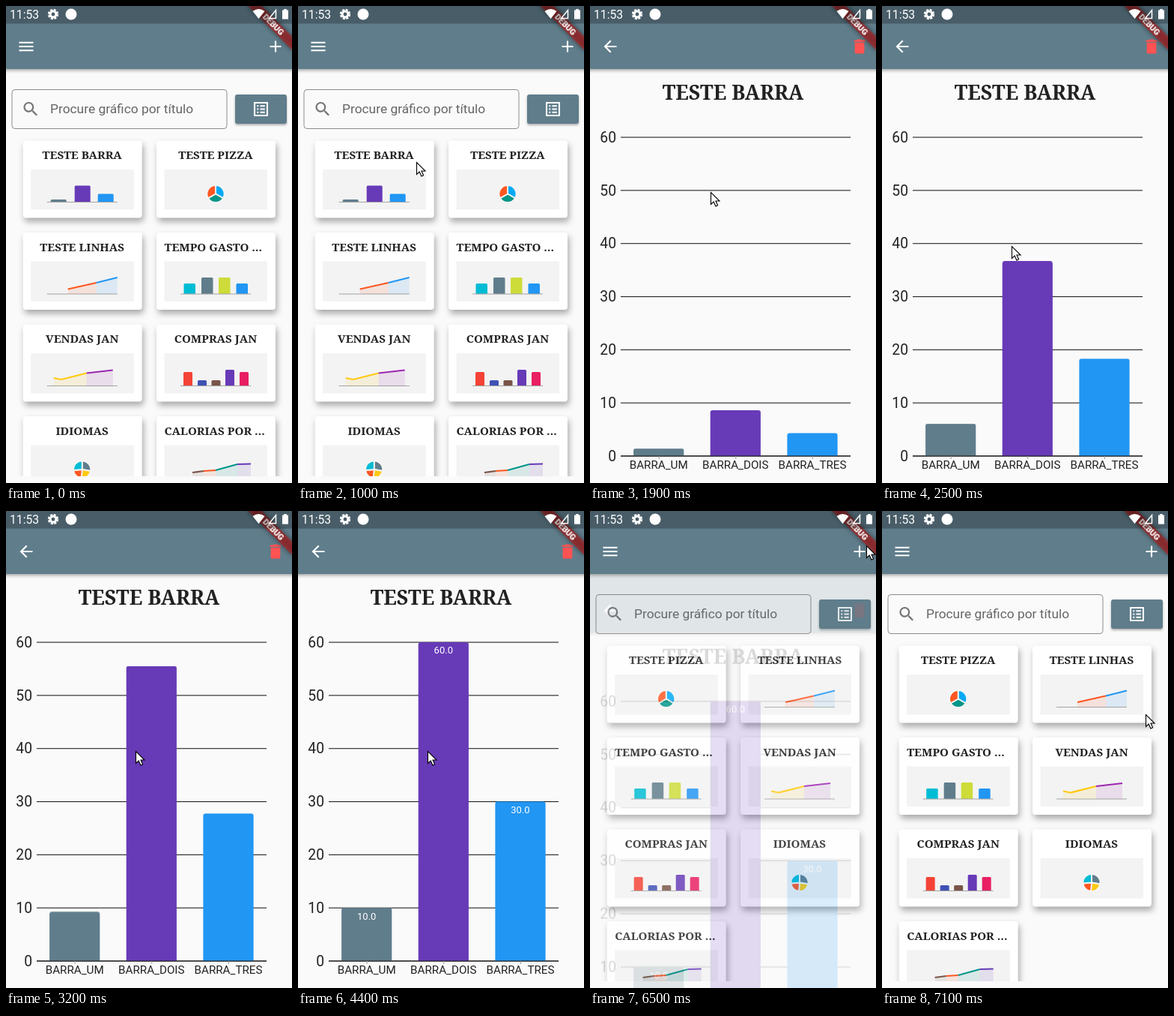
These frames come from a looping animation (382x636 px, 7.2 s). An HTML page:

```html
<!DOCTYPE html>
<html lang="pt">
<head>
<meta charset="utf-8">
<title>Gráficos</title>
<style>
html, body { margin: 0; width: 100%; height: 100%; overflow: hidden; background: #fafafa; }
svg { display: block; width: 100%; height: 100%; font-family: Roboto, sans-serif; }
.serif { font-family: "Noto Serif", serif; font-weight: 700; fill: #212121; }
.mid { text-anchor: middle; }
.end { text-anchor: end; }
.bar { filter: drop-shadow(0 2px 2px rgba(0, 0, 0, .35)); }
.card { filter: drop-shadow(2px 5px 4.5px rgba(0, 0, 0, .33)); }
.button { filter: drop-shadow(0 2px 1.5px rgba(0, 0, 0, .3)); }
.blur { filter: blur(3.7px); }

#before, #after, #detail, #cursor, #labels, #bars path {
  animation: 7200ms linear infinite paused;
}
#before { animation-name: before; animation-timing-function: step-end; }
#after { animation-name: after; animation-timing-function: step-end; }
#detail { animation-name: slide, fade; }
#bars path { animation-name: grow; transform-box: fill-box; }
#labels { animation-name: reveal; }
#cursor { animation-name: move; }

@keyframes before { 0% { visibility: visible } 50%, 100% { visibility: hidden } }
@keyframes after { 0% { visibility: hidden } 50%, 100% { visibility: visible } }
@keyframes slide {
  0% { transform: translateY(159px) }
  18.75% { transform: translateY(159px); animation-timing-function: cubic-bezier(.4, 0, .2, 1) }
  22.92% { transform: translateY(0) }
  87.22% { transform: translateY(0); animation-timing-function: cubic-bezier(.8, 0, .6, 1) }
  91.94%, 100% { transform: translateY(159px) }
}
@keyframes fade {
  0% { opacity: 0 }
  18.75% { opacity: 0; animation-timing-function: cubic-bezier(.42, 0, 1, 1) }
  22.92% { opacity: 1 }
  87.22% { opacity: 1; animation-timing-function: cubic-bezier(0, 0, .58, 1) }
  91.94%, 100% { opacity: 0 }
}
@keyframes grow {
  0% { transform: translateY(100%) }
  24.33% { transform: translateY(100%); animation-timing-function: cubic-bezier(.333, .667, .667, 1) }
  51.97%, 100% { transform: translateY(0) }
}
@keyframes reveal {
  0%, 52.78% { opacity: 0 }
  56.94%, 100% { opacity: 1 }
}
@keyframes move {
  0% { transform: translate(384px, 320px); animation-timing-function: ease-in-out }
  13.2%, 21.5% { transform: translate(158px, 208px) }
  26.39% { transform: translate(161px, 248px); animation-timing-function: ease-out }
  33%, 64% { transform: translate(173px, 320px); animation-timing-function: ease-in-out }
  82%, 95.83% { transform: translate(369px, 46px) }
  98.61%, 100% { transform: translate(352px, 271px) }
}
</style>
</head>
<body>
<svg id="stage" viewBox="0 0 382 636"></svg>
<script>
const C = {
  slate: '#607d8b', violet: '#673ab7', blue: '#2196f3', sky: '#03a9f4', cyan: '#00bcd4',
  teal: '#009688', lime: '#cddc39', amber: '#ffca10', orange: '#ff5722', red: '#f44336',
  pink: '#e91e63', indigo: '#3f51b5', brown: '#795548', purple: '#9c27b0'
};
const ICON = {
  menu: 'M3 18h18v-2H3zm0-5h18v-2H3zm0-7v2h18V6z',
  add: 'M19 13h-6v6h-2v-6H5v-2h6V5h2v6h6z',
  back: 'M20 11H7.83l5.59-5.59L12 4l-8 8 8 8 1.41-1.41L7.83 13H20z',
  bin: 'M6 19c0 1.1.9 2 2 2h8c1.1 0 2-.9 2-2V7H6zM19 4h-3.5l-1-1h-5l-1 1H5v2h14z',
  search: 'M15.5 14h-.79l-.28-.27A6.5 6.5 0 1 0 13.73 14.43l.27.28v.79l5 4.99L20.49 19zm-6 0a4.5 4.5 0 1 1 0-9 4.5 4.5 0 0 1 0 9z',
  list: 'M19 5v14H5V5h14m1.1-2H3.9c-.5 0-.9.4-.9.9v16.2c0 .4.4.9.9.9h16.2c.4 0 .9-.5.9-.9V3.9c0-.5-.5-.9-.9-.9zM11 7h6v2h-6zm0 4h6v2h-6zm0 4h6v2h-6zM7 7h2v2H7zm0 4h2v2H7zm0 4h2v2H7z'
};

const rect = (x, y, w, h, fill, more = '') =>
  `<rect x="${x}" y="${y}" width="${w}" height="${h}" fill="${fill}" ${more}/>`;
const text = (s, x, y, size, more = '') =>
  `<text x="${x}" y="${y}" font-size="${size}" ${more}>${s}</text>`;
const icon = (name, x, y, fill = '#fff') =>
  `<path transform="translate(${x} ${y}) scale(1.06) translate(-12 -12)" fill="${fill}" d="${ICON[name]}"/>`;
const column = (x, top, w, base, r, fill) =>
  `<path fill="${fill}" d="M${x} ${base}V${top + r}q0 ${-r} ${r} ${-r}h${w - 2 * r}q${r} 0 ${r} ${r}V${base}z"/>`;

// Small previews, relative to the card corner
const BASE = 82;
const axis = rect(32, BASE - .5, 94, 1, '#a3a3a3');
const columns = (w, list) =>
  list.map(([x, h, c]) => column(x, BASE - h, w, BASE, 1.5, c)).join('') + axis;
const line = (pts, colors) => axis + colors.map((c, i) => {
  const [a, b] = [pts[i], pts[i + 1]];
  return `<path fill="${c}" opacity=".11" d="M${a}L${b}V${BASE}H${a[0]}z"/>` +
    `<path stroke="${c}" stroke-width="2.2" d="M${a}L${b}"/>`;
}).join('');
const pie = (ends, colors) => {
  const at = deg => {
    const a = deg * Math.PI / 180;
    return [79 + 11.5 * Math.sin(a), 71 - 11.5 * Math.cos(a)];
  };
  return colors.map((c, i) =>
    `<path fill="${c}" stroke="#f5f5f5" stroke-width="1.8" d="M79 71L${at(ends[i])}A11.5 11.5 0 0 1 ${at(ends[i + 1])}z"/>`
  ).join('');
};

const charts = [
  ['TESTE BARRA', columns(21, [[37, 3.5, C.slate], [69, 22, C.violet], [100, 11, C.blue]])],
  ['TESTE PIZZA', pie([0, 120, 240, 360], [C.sky, C.teal, C.orange])],
  ['TESTE LINHAS', line([[60, 75.5], [98, 67], [126, 60]], [C.orange, C.blue])],
  ['TEMPO GASTO …', columns(15.5, [[36.5, 14, C.cyan], [60, 22, C.slate], [83, 22, C.lime], [106.5, 14, C.blue]])],
  ['VENDAS JAN', line([[41, 71.5], [51, 73.5], [85, 65], [120, 61]], [C.amber, C.amber, C.purple])],
  ['COMPRAS JAN', columns(12, [[36, 18.5, C.red], [55, 7.5, C.indigo], [73.5, 7.5, C.brown], [92, 21.5, C.violet], [111, 18.5, C.pink]])],
  ['IDIOMAS', pie([0, 100, 185, 265, 360], [C.slate, C.amber, C.orange, C.cyan])],
  ['CALORIAS POR …', line([[48, 75], [63, 73], [79, 72], [108, 64], [126, 63.5]], [C.brown, C.orange, C.teal, C.violet])]
];

const card = ([title, art], i) => {
  const cut = title.endsWith('…');
  return `<g transform="translate(${i % 2 ? 201 : 22.7} ${179.5 + 122.5 * (i >> 1)})">` +
    rect(0, 0, 159, 103, '#fff', 'rx="4" class="card"') +
    rect(10.5, 38.5, 137.5, 53.5, '#f3f3f3') +
    text(title, cut ? 10.5 : 79, 24.5, 15.15, `class="serif${cut ? '' : ' mid'}"`) + art + '</g>';
};
const cards = (id, list) => `<g id="${id}">${list.map(card).join('')}</g>`;

const appBar = rect(-4, -4, 390, 88, C.slate, 'class="bar"');
const home = `<g clip-path="url(#view)">${cards('before', charts)}${cards('after', charts.slice(1))}</g>` +
  appBar + icon('menu', 27, 54) + icon('add', 360, 54) +
  rect(8, 111.5, 287, 52, 'none', 'rx="4" stroke="#8c8c8c"') +
  icon('search', 33, 137.5, '#757575') +
  text('Procure gráfico por título', 59, 143, 17.35, 'fill="#666"') +
  rect(306, 118, 69, 39, C.slate, 'rx="3" class="button"') + icon('list', 340.5, 137.5);

// Full chart
const FLOOR = 600, UNIT = 425 / 60;
const series = [
  ['BARRA_UM', 10, 91.7, C.slate],
  ['BARRA_DOIS', 60, 194.3, C.violet],
  ['BARRA_TRES', 30, 297, C.blue]
];
const grid = [0, 10, 20, 30, 40, 50, 60].map(v => {
  const y = FLOOR - v * UNIT;
  return rect(41, y - .5, 307, 1.1, '#222') + text(v, 35, y + 6.8, 19.3, 'class="end" fill="#222"');
}).join('');
const each = f => series.map(f).join('');
const detail = '<g id="detail">' + rect(0, 0, 382, 640, '#fafafa') + appBar +
  icon('back', 27, 54) + icon('bin', 360, 54, '#ff5252') +
  text('TESTE BARRA', 191, 125, 26.9, 'class="serif mid"') + grid +
  '<g clip-path="url(#floor)"><g id="bars">' +
  each(([, v, x, c]) => column(x - 33.6, FLOOR - v * UNIT, 67.2, FLOOR, 3, c)) + '</g></g>' +
  rect(41, FLOOR - .5, 307, 1.1, '#222') +
  each(([name, , x]) => rect(x, FLOOR, 1, 4, '#999') + text(name, x, 617, 15.2, 'class="mid" fill="#222"')) +
  '<g id="labels" fill="#fff">' +
  each(([, v, x]) => text(v.toFixed(1), x, FLOOR - v * UNIT + 15.4, 13, 'class="mid"')) + '</g></g>';

const banner = '<g transform="translate(382 0) rotate(45) scale(1.06)">' +
  rect(-40, 27, 80, 12, '#000', 'opacity=".5" class="blur"') +
  rect(-40, 27, 80, 12, '#b71c1c', 'opacity=".63"') +
  text('DEBUG', 0, 36.6, 10.2, 'class="mid" fill="#fff" font-weight="900"') + '</g>';

const status = banner + rect(0, 0, 382, 23.5, '#000', 'opacity=".25"') +
  text('11:53', 5, 17, 15.7, 'fill="#fff"') +
  '<g fill="none" stroke="#fff"><circle cx="63" cy="11" r="3.9" stroke-width="3"/>' +
  '<circle cx="63" cy="11" r="6" stroke-width="2.4" stroke-dasharray="3 1.712"/>' +
  '<path stroke-width="1.5" d="M360.5 5.5V16.5H351.5z"/></g>' +
  '<g fill="#fff"><circle cx="87" cy="11" r="7.5"/>' +
  '<path d="M329.5 7Q337.5 1 345.5 7L337.5 17z"/>' +
  '<path d="M369 5.5h2.2V4h3.6v1.5H377V17.5h-8z"/></g>';

const cursor = '<path id="cursor" fill="#fff" stroke="#000" stroke-width="1.1" d="M.5.5v16l3.7-3.5 2.7 6 2.7-1.2-2.6-5.8h5z"/>';

document.getElementById('stage').innerHTML =
  '<defs><clipPath id="view"><path d="M0 84h382v543H0z"/></clipPath>' +
  `<clipPath id="floor"><path d="M0 84h382V${FLOOR}H0z"/></clipPath></defs>` +
  rect(0, 0, 382, 636, '#fafafa') + home + detail + status + cursor;

// Hold each pose for a tenth of a second
const LOOP = 7200, STEP = 100;
const tracks = document.getAnimations();
const start = performance.now();
function tick() {
  const t = (performance.now() - start) % LOOP;
  const time = Math.floor(t / STEP) * STEP;
  for (const a of tracks) a.currentTime = time;
  requestAnimationFrame(tick);
}
tick();
</script>
</body>
</html>
```
